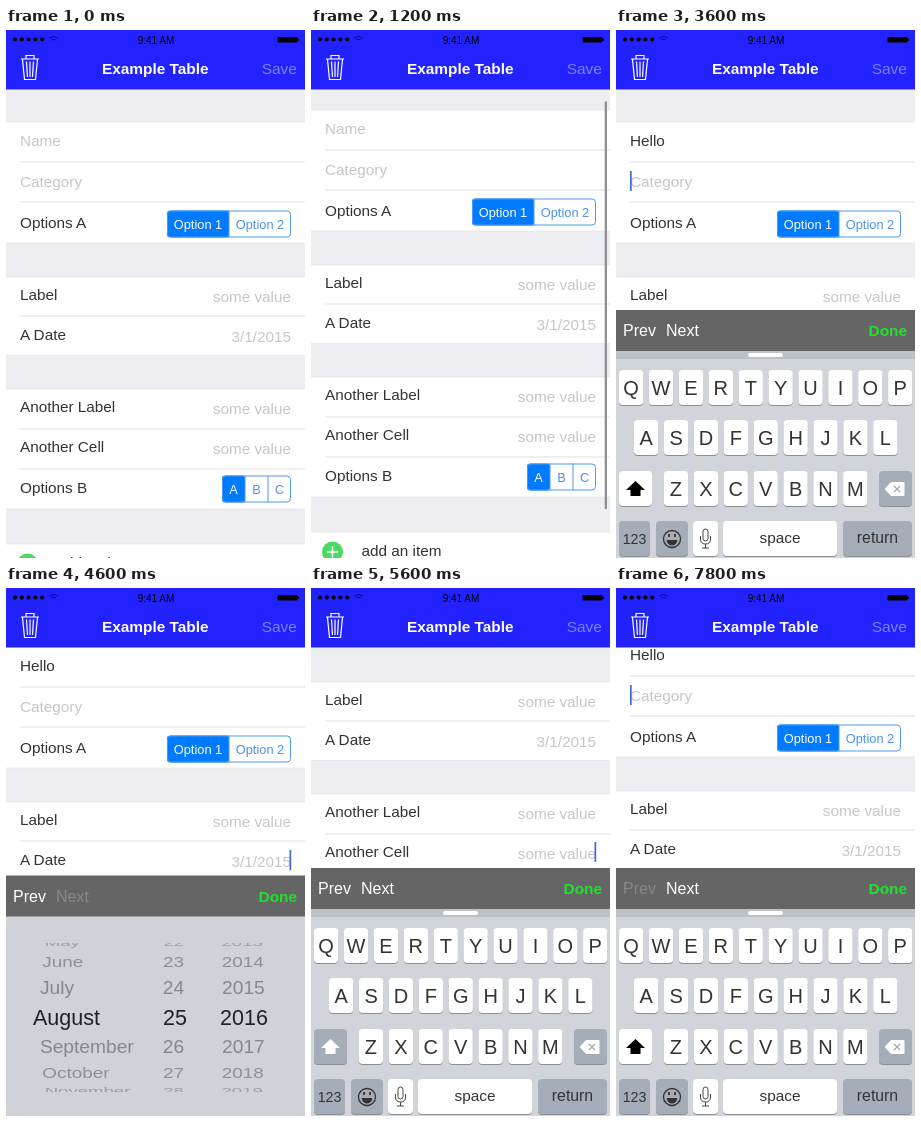
Animation of 299x530 px, one loop 8 s. Source, as an HTML page:

```html
<!DOCTYPE html>
<html lang="en">
<head>
<meta charset="utf-8">
<title>Example Table</title>
<style>
  html, body { margin: 0; width: 100%; height: 100%; overflow: hidden; background: #fff; }
  svg { display: block; width: 100vw; height: 100vh; font-family: "Liberation Sans", Arial, sans-serif; }
  text { white-space: pre; }
</style>
</head>
<body>
<svg id="stage" viewBox="0 0 299 530"></svg>
<script>
const LOOP = 8000, STEP = 200;
const BLUE = '#007aff', HEADER = '#2222ff', INK = '#333336', FAINT = '#c6c6cc', KEY_GREY = '#a5aeb8';
const BODY = 15.3;
const stage = document.getElementById('stage');
const pen = document.createElement('canvas').getContext('2d');
pen.font = `${BODY}px "Liberation Sans", Arial, sans-serif`;

// Vertical centre of each row in the unscrolled table.
const ROWS = { name: 113, category: 154, label: 268, date: 308, label2: 380, cell2: 420 };
const ORDER = Object.keys(ROWS);

// When each field receives focus.
const FOCUS = [[1600, 'name'], [3400, 'category'], [4000, 'label'], [4400, 'date'], [4800, 'label2'],
  [5200, 'cell2'], [6000, 'label2'], [6400, 'date'], [6800, 'label'], [7400, 'category'], [8000, 'name']];

const SCROLL = [[200, 0], [600, 66], [800, 64], [1000, 42], [1200, 12], [1400, 0], [4200, 0], [4400, 33],
  [4600, 33], [4800, 100], [5000, 113], [5200, 140], [5400, 153], [6200, 153], [6600, 33], [6800, 33], [7000, 44]];

function track(points, t) {
  const i = points.findIndex(p => p[0] > t);
  if (i < 0) return points[points.length - 1][1];
  if (i === 0) return points[0][1];
  const [t0, a] = points[i - 1], [t1, b] = points[i];
  return a + (b - a) * (t - t0) / (t1 - t0);
}

const rect = (x, y, w, h, fill, r = 0, more = '') =>
  `<rect x="${x}" y="${y}" width="${w}" height="${h}" rx="${r}" fill="${fill}" ${more}/>`;
const path = (d, stroke, width = 1, fill = 'none') =>
  `<path d="${d}" stroke="${stroke}" stroke-width="${width}" fill="${fill}"/>`;
const text = (x, y, s, fill = INK, size = BODY, anchor = 'start', more = '') =>
  `<text x="${x}" y="${y}" fill="${fill}" font-size="${size}" text-anchor="${anchor}" ${more}>${s}</text>`;

function header() {
  let s = rect(0, 2, 299, 59.5, HEADER);
  for (let i = 0; i < 5; i++) s += `<circle cx="${9 + i * 6.8}" cy="11.5" r="2.1"/>`;
  s += path('M43 10Q47.500 7 52 10M45 12Q47.500 10.500 50 12', '#000', 0.6);
  s += text(150, 15.5, '9:41 AM', '#000', 10, 'middle');
  s += rect(271.5, 9, 20, 5.5, '#000', 1) + rect(291.5, 10.5, 1.5, 2.5, '#000');
  s += path('M15 31H33M20 30.500V27.500H28V30.500M16.500 31.500L18.500 51.500H29.500L31.500 31.500M20.500 33.500L21.500 49M24 33.500V49M27.500 33.500L26.500 49', '#fff', 1.2);
  s += text(149.3, 46.2, 'Example Table', '#fff', 15.4, 'middle', 'font-weight="bold"');
  return s + text(291, 46.2, 'Save', '#8080ff', 15.5, 'end');
}

function segments(y, edges, labels) {
  const left = edges[0], right = edges[edges.length - 1];
  let s = rect(left, y, edges[1] - left, 27, BLUE, 3);
  s += rect(left + .5, y + .5, right - left - 1, 26, 'none', 3.5, 'stroke="#4c9bf0"');
  labels.forEach((label, i) => {
    if (i) s += path(`M${edges[i]} ${y}v27`, '#4c9bf0');
    s += text((edges[i] + edges[i + 1]) / 2, y + 18, label, i ? '#4c93e6' : '#fff', 12.8, 'middle');
  });
  return s;
}

function table(scroll, focus, typed) {
  const groups = [[94, 215, 134, 174], [249, 327.5, 288], [361, 481, 401, 441], [516, 555.5]];
  let s = rect(0, 61.5, 299, 600, '#ededf2');
  for (const [top, bottom, ...lines] of groups) {
    s += rect(0, top, 299, bottom - top, '#fff');
    s += path(`M0 ${top}H299M0 ${bottom}H299`, '#e2e2e7', 0.7);
    for (const y of lines) s += path(`M14 ${y}H299`, '#dedee2', 0.9);
  }
  s += typed ? text(14, 117.6, typed) : text(14, 118, 'Name', FAINT);
  s += text(14, 159, 'Category', FAINT) + text(14, 199.5, 'Options A');
  s += segments(182.5, [161, 223, 285], ['Option 1', 'Option 2']);

  const valueRow = (id, label, value) =>
    text(14, ROWS[id] + 4.2, label) + text(285, ROWS[id] + 5.6, value, FAINT, BODY, 'end');
  s += valueRow('label', 'Label', 'some value') + valueRow('date', 'A Date', '3/1/2015');
  s += valueRow('label2', 'Another Label', 'some value') + valueRow('cell2', 'Another Cell', 'some value');

  s += text(14, 464.5, 'Options B') + segments(447.5, [216, 239, 262, 285], ['A', 'B', 'C']);
  s += '<circle cx="21.500" cy="536" r="10.500" fill="#4cd964"/>' + path('M16 536H27M21.500 530.500V541.500', '#fff', 1.6);
  s += text(50.5, 540, 'add an item');

  if (focus) {
    const leftField = focus === 'name' || focus === 'category';
    const x = leftField ? 14 + (focus === 'name' ? pen.measureText(typed).width : 0) : 283.5;
    s += rect(x, ROWS[focus] - 11, 1.7, 20, '#4169e1');
  }
  return `<g transform="translate(0 ${-scroll})">${s}</g>`;
}

function toolbar(pressed) {
  const shade = name => name === pressed ? '#888' : '#fff';
  return rect(0, 0, 299, 41, '#656565') + text(7, 26, 'Prev', shade('Prev'), 16)
    + text(50, 26, 'Next', shade('Next'), 16) + text(291, 26, 'Done', '#20e22a', 15.4, 'end', 'font-weight="bold"');
}

function key(x, y, w, label = '', fill = '#fff', size = 20, drop = 25) {
  return rect(x, y + 1, w, 35, '#8b9096', 4) + rect(x, y, w, 35, fill, 4)
    + text(x + w / 2, y + drop, label, INK, size, 'middle');
}

function keyboard(shifted) {
  let s = rect(0, 322.5, 299, 207.5, '#d1d5db') + rect(0, 322.5, 299, 8.5, '#bcc1c8') + rect(132, 325, 35, 4, '#fff', 2);
  [['QWERTYUIOP', 3, 342], ['ASDFGHJKL', 18, 392], ['ZXCVBNM', 47.8, 443]].forEach(([letters, x, y]) =>
    [...letters].forEach((c, i) => s += key(x + i * 29.9, y, 24.3, c)));
  s += key(3, 443, 33, '', shifted ? '#fff' : KEY_GREY);
  s += path('M19.500 453L29 462H24.500V468H14.500V462H10Z', 'none', 0, shifted ? '#000' : '#fff');
  s += key(263, 443, 33, '', KEY_GREY) + path('M269 461L275 454.500H288V467.500H275Z', '#fff', 1, '#fff');
  s += path('M278 458L284 464M284 458L278 464', KEY_GREY, 1.4);
  s += key(3, 493, 31, '123', KEY_GREY, 14.2, 23) + key(40, 493, 32, '', KEY_GREY) + key(77, 493, 25);
  s += key(107, 493, 114, 'space', '#fff', 15.4, 22) + key(227, 493, 69, 'return', KEY_GREY, 15.8, 22);
  s += '<circle cx="56" cy="511" r="8.500" fill="none" stroke="#333" stroke-width="1.300"/>';
  s += path('M51 512.500H61Q60 517 56 517T51 512.500Z', '#333', 1, '#333') + path('M53 506V509M59 506V509', '#333', 1.8);
  s += rect(87, 501, 5, 12, 'none', 2.5, 'stroke="#444"');
  return s + path('M84.500 508V511Q84.500 516 89.500 516T94.500 511V508M89.500 516V520M86 520H93', '#444');
}

// Rows sit on a cylinder, seen from the front; its rims hide part of the outermost rows.
function picker() {
  const months = ['May', 'June', 'July', 'August', 'September', 'October', 'November'];
  const ground = '#cfd3d9';
  let s = rect(0, 330, 299, 200, ground);
  months.forEach((month, i) => {
    const row = i - 3, angle = row * 0.36, chosen = row === 0;
    const fill = chosen ? '#222' : ['', '#85888d', '#8d9095', '#9a9da2'][Math.abs(row)];
    const size = chosen ? 21.5 : 19.5 - Math.abs(row) * 0.3;
    const put = (x, label, anchor) => text(x, size * 0.36, label, fill, size, anchor);
    const y = 431 + 84 * Math.sin(angle);
    s += `<g transform="translate(0 ${y}) scale(1 ${Math.cos(angle)})">`
      + put(chosen ? 27 : 31.5 + Math.abs(row) * 2.4, month, 'start')
      + put(chosen ? 169 : 167.5, 25 + row, 'middle')
      + put(238 - Math.abs(row) * 0.6, 2016 + row, 'middle') + '</g>';
  });
  return s + rect(0, 330, 299, 27, ground) + rect(0, 506, 299, 24, ground);
}

function draw(t) {
  const next = FOCUS.findIndex(f => f[0] > t);
  const focus = next > 0 ? FOCUS[next - 1][1] : '';
  const [changeAt, target] = FOCUS[next];
  const pressed = focus && changeAt - t <= STEP
    ? (ORDER.indexOf(target) > ORDER.indexOf(focus) ? 'Next' : 'Prev') : '';
  const typed = 'Hello'.slice(0, Math.max(0, Math.floor((t - 2000) / 200)));
  const scroll = track(SCROLL, t);

  let s = table(scroll, focus, typed);
  if (t >= 200 && t <= 1200) s += rect(293.7, 62.5 + scroll * 0.9, 2.3, 408, '#8f8f94', 1.1);
  s += rect(0, 0, 299, 61.5, '#fff') + header();
  if (focus) {
    const isDate = focus === 'date';
    const shifted = focus === 'category' || (focus === 'name' && !typed);
    const rise = track([[1400, 248], [1600, 110], [1800, 0]], t);
    s += `<g transform="translate(0 ${rise})">${isDate ? picker() : keyboard(shifted)}`
      + `<g transform="translate(0 ${isDate ? 289.5 : 282})">${toolbar(pressed)}</g></g>`;
  }
  stage.innerHTML = s;
}

let shown = -1;
function frame() {
  const t = Math.floor(performance.now() % LOOP / STEP) * STEP;
  if (t !== shown) draw(shown = t);
  requestAnimationFrame(frame);
}
frame();
</script>
</body>
</html>
```
